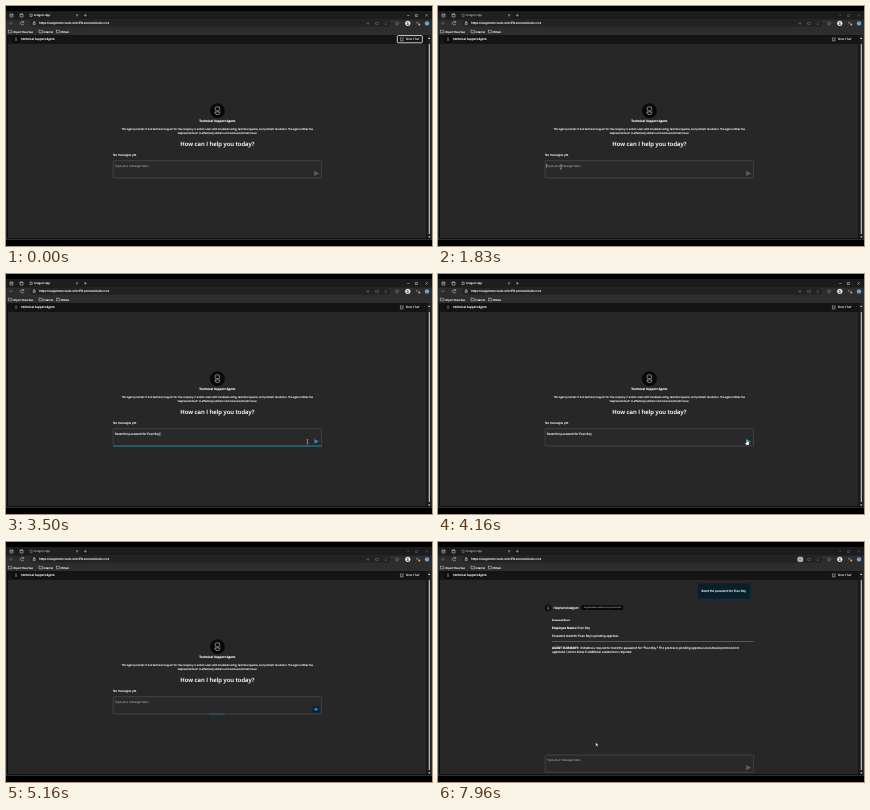
Recreate the animation shown at these times as an HTML page. Size 426 by 240 pixels, loop 8000 ms.

```html
<!DOCTYPE html>
<html lang="en">
<head>
<meta charset="utf-8">
<title>Support chat</title>
<style>
  html, body { margin: 0; width: 100%; height: 100%; overflow: hidden; background: #000; }
  svg { display: block; width: 100vw; height: 100vh; }
  text { font-family: "Open Sans", "Noto Sans", sans-serif; fill: currentColor; stroke: currentColor; stroke-width: .1px; text-rendering: geometricPrecision; white-space: pre; }
  .b { font-weight: 700; }
  .semi { font-weight: 600; }
  .mid { text-anchor: middle; }
  .line { fill: none; stroke: #ddd; stroke-width: .5; }
  .dim { stroke: #777; }
</style>
</head>
<body>
<svg id="stage" viewBox="0 0 426 240" preserveAspectRatio="none"></svg>
<script>
const LOOP = 8000;
const PERSON = "Evan Roy";
const REQUEST = `Reset the password for ${PERSON}`;
const TOOLBAR = "#2d2d2d";
const stage = document.getElementById("stage");

function add(parent, tag, attrs, content) {
  const node = document.createElementNS("http://www.w3.org/2000/svg", tag);
  for (const key in attrs) node.setAttribute(key, attrs[key]);
  if (content) node.textContent = content;
  return parent.appendChild(node);
}
const group = (parent, attrs = {}) => add(parent, "g", attrs);
const rect = (p, x, y, width, height, fill, more) => add(p, "rect", { x, y, width, height, fill, ...more });
const dot = (p, cx, cy, r, fill) => add(p, "circle", { cx, cy, r, fill });
const path = (p, d, more) => add(p, "path", { d, class: "line", ...more });
const label = (p, x, y, content, size = 2.95, cls = "", color = "#fff") =>
  add(p, "text", { x, y, class: cls, style: `font-size:${size}px;color:${color}` }, content);

// Browser frame
rect(stage, 0, 0, 426, 240, "#000");
rect(stage, 0, 5, 426, 9, "#1c1c1c");
rect(stage, 0, 13.5, 426, 15.5, TOOLBAR);
rect(stage, 22, 6, 52, 8, "#1f1f1f", { rx: 1.5 });
rect(stage, 24, 14.3, 360, 6.2, "#222", { rx: 3 });
path(stage, "M4 8h3v3h-3zM4 9h3M14 8h3v3h-3zM14 8.4h3");
path(stage, "M7 17.3h-3.4l1.4-1.4m-1.4 1.4l1.4 1.4", { class: "line dim" });
path(stage, "M17.5 16.2a1.7 1.7 0 1 0 .3 1.6m-.2-2.6v1.4h-1.3");
path(stage, "M27.2 16.8h2v1.8h-2zM27.6 16.8v-.8a.6 .6 0 0 1 1.2 0v.8", { "stroke-width": .4 });
path(stage, "M70.2 8.4l1.8 1.8m0-1.8l-1.8 1.8M78 9.3h2.6m-1.3-1.3v2.6", { "stroke-width": .4 });
label(stage, 33, 18.3, "https://aaqpmstec-web-robcil5t.azurewebsites.net", 3);

const tab = group(stage);
path(tab, "M24 8.2h2.2v2.2h-2.2z", { "stroke-width": .4 });
label(tab, 28, 10.3, "AI Agent App", 2.7);
const controls = group(stage);
path(controls, "M401.2 9.5h2.2M409.4 8.5h2v2h-2zM419.6 8.4l2 2m0-2l-2 2", { "stroke-width": .45 });

for (const [x, name] of [[2.5, "Import Favorites"], [33, "Internal"], [50.5, "Others"]]) {
  path(stage, `M${x} 24h1.2l.5 .6h1.7v2.2h-3.4z`, { "stroke-width": .4 });
  label(stage, x + 4.6, 26.5, name, 2.58);
}

const pill = rect(stage, 359.4, 14.8, 5.8, 5.2, "#b4b4b4", { rx: 1.8 });
path(stage, "M360.5 17.4h3M362 16v2.8M369.6 16.4h2.8v2h-2.8zM378.8 16.3l1 1.1 1-1.1m-2 2.3h2", { class: "line dim" });
path(stage, "M390 15.8h1v3.2h-1zM391 16.2l2.3 1.2-2.3 1.3", { class: "line dim" });
dot(stage, 401.8, 17.3, 2.6, "#eee7da");
dot(stage, 401.8, 16.6, .8, "#77604f");
rect(stage, 400.6, 17.5, 2.4, 1.6, "#77604f", { rx: .8 });
path(stage, "M410 17.4l1.4-1.2 1 1.4");
dot(stage, 413.3, 18.4, 1, "#e4ad32");
dot(stage, 421, 17.4, 2.2, "#739fd2");

// Page shell
rect(stage, 0, 29, 426, 205, TOOLBAR);
rect(stage, 1, 29, 424, 204, "#0a0a0a");
rect(stage, 2, 29, 418.5, 203.3, "#272727");
rect(stage, 2, 29, 418.5, 9, "#141414");
rect(stage, 421.3, 29, 3.7, 203.3, "#202020");
rect(stage, 422.7, 38, 1.3, 190, "#b4b4b4", { rx: .6 });
path(stage, "M422 33l1.2-1.6 1.2 1.6zM422 230.5l1.2 1.6 1.2-1.6z", { style: "fill:#ddd;stroke:none" });

function agentIcon(parent, x, y, scale) {
  const g = group(parent, { transform: `translate(${x} ${y}) scale(${scale})` });
  dot(g, 0, 0, 7.4, "#080808");
  const style = "stroke:#d0d0d0;stroke-width:.6";
  rect(g, -2.2, -3.8, 4.4, 3.8, "none", { rx: 1.1, style });
  path(g, "M-.9 -2h.1M.8 -2h.1M-2.4 1.2h4.8v1q-.4 1.7-2.4 1.7t-2.4-1.7z", { style });
}
agentIcon(stage, 10, 33.2, .45);
label(stage, 15, 34.2, "Technical Support Agent", 2.9, "semi");
const chatRing = rect(stage, 391.3, 29.6, 25, 7.2, "none", { rx: 1, stroke: "#fff", "stroke-width": .8 });
path(stage, "M397 32.8v2.1h-2.6v-3h1.8m-.2 1.4l1.8-1.8", { "stroke-width": .4 });
label(stage, 399.8, 34.2, "New Chat", 3, "", "#ddd");

// Welcome view
const welcome = group(stage);
agentIcon(welcome, 211.4, 104.7, 1);
label(welcome, 211.3, 115.7, "Technical Support Agent", 2.97, "b mid");
label(welcome, 211.3, 124.2, "This agent provides IT and technical support for the company. It assists users with troubleshooting, technical queries, and problem resolution. The agent utilizes the", 2.53, "mid");
label(welcome, 211.3, 127.8, "'HelpServiceTools' to effectively address and resolve technical issues.", 2.53, "mid");
label(welcome, 211.4, 140, "How can I help you today?", 5.9, "semi mid");
label(welcome, 107, 150, "No messages yet.");

// Answer view
const answer = group(stage);
rect(answer, 260, 41.2, 52.3, 15.6, "#08202c", { rx: 1.4 });
label(answer, 263.4, 50.1, REQUEST);
agentIcon(answer, 110.2, 66, .44);
label(answer, 115.5, 66.9, "HelpServiceAgent", 2.95, "semi");
rect(answer, 143.4, 63.3, 41.8, 4.8, "#080808", { rx: 1 });
label(answer, 164.3, 66.4, "AI-generated content may be incorrect", 2.05, "mid", "#888");
label(answer, 114, 78.9, "Password Reset", 2.3, "b");
const nameRow = label(answer, 114, 86.8, "", 2.97);
add(nameRow, "tspan", { class: "b" }, "Employee Name:");
add(nameRow, "tspan", {}, ` ${PERSON}`);
label(answer, 114, 95, `Password reset for ${PERSON} is pending approval.`, 2.95);
rect(answer, 114, 99.4, 201.5, .5, "#8a8a8a");
const summary = label(answer, 114, 106.7, "", 2.97);
add(summary, "tspan", { class: "b" }, "AGENT SUMMARY:");
add(summary, "tspan", {}, ` I initiated a request to reset the password for "${PERSON}." The process is pending approval and should proceed once`);
label(answer, 114, 111.3, "approved. Let me know if additional assistance is required.", 2.95);

// Message box
const box = group(stage);
rect(box, 107.2, 154.7, 208.4, 17.3, "#292929", { rx: .9, stroke: "#5c5c5c", "stroke-width": .5 });
const hint = label(box, 109, 161, "Type your message here...", 2.9, "", "#949494");
const typed = label(box, 109, 161, REQUEST);
const caret = rect(box, 0, 158, .4, 3.7, "#fff");
const send = path(box, "M308.3 165.6l4 1.8-4 1.8 .7-1.8zM309 167.4h1.8", { "stroke-width": .45 });
const stop = group(box);
rect(stop, 306.8, 164.2, 6.4, 6.4, "#0c1c28", { rx: 1.2 });
dot(stop, 310, 167.3, 1.7, "#1a7fc0");
const underline = rect(box, 107.2, 171.7, 208.6, .7, "#1994b4");

// Pointers
const pointers = {
  arrow: path(stage, "M0 0v3.6l.9-.8 .6 1.3 .6-.3-.6-1.2h1.1z", { style: "fill:#fff;stroke:#000;stroke-width:.2" }),
  beam: path(stage, "M-.8 -2h1.6M0 -2v4M-.8 2h1.6", { style: "stroke:#e6e6e6;stroke-width:.45" }),
  hand: path(stage, "M-.5 -1.9q.5-.6 1 0v1.7l1.5 .4q.5 .3 .3 1l-.5 1.7h-2.4l-1.3-1.7q.1-.8 1.4-.1z", { style: "fill:#fff;stroke:#111;stroke-width:.2" })
};

// Rows: time, value(s)
const linePhase = [[1900, 0], [2130, 1], [3960, 1], [4120, 0], [4300, 0], [4560, 1], [5030, 1], [5160, .077]];
const route = [
  [960, 178, 178], [1300, 145, 170], [1630, 123, 161], [2760, 123, 161],
  [2900, 173, 163], [3160, 258, 166], [3560, 309, 168], [5030, 309, 168]
];
const lateRoute = [[7760, 176, 188], [7960, 157.8, 200.6]];

function sample(rows, t) {
  if (t <= rows[0][0]) return rows[0].slice(1);
  for (let i = 1; i < rows.length; i++) {
    const a = rows[i - 1], b = rows[i];
    if (t < b[0]) {
      const k = (t - a[0]) / (b[0] - a[0]);
      return a.slice(1).map((v, j) => v + (b[j + 1] - v) * k);
    }
  }
  return rows[rows.length - 1].slice(1);
}
const within = (t, from, to) => t >= from && t < to;
const show = (node, on) => node.setAttribute("visibility", on ? "visible" : "hidden");
const typedWidth = typed.getComputedTextLength();

function drawPointer(t) {
  const late = t >= 7760;
  const [x, y] = sample(late ? lateRoute : route, t);
  const kind = late || y > 172 ? "arrow" : x > 305 ? "hand" : "beam";
  const visible = late || within(t, 960, 5030);
  for (const name in pointers) show(pointers[name], visible && name === kind);
  pointers[kind].setAttribute("transform", `translate(${x} ${y})`);
}

function draw(t) {
  const active = t < 500 || within(t, 1900, 5030);
  const answered = t >= 6100;
  const filled = within(t, 2360, 4230);
  const busy = within(t, 4230, 6100);

  tab.setAttribute("opacity", active ? 1 : .6);
  controls.setAttribute("opacity", active ? 1 : .4);
  show(chatRing, t < 500);
  show(pill, answered);
  show(welcome, !answered);
  show(answer, answered);

  box.setAttribute("transform", `translate(0 ${answered ? 58.3 : 0})`);
  show(hint, !filled);
  show(typed, filled);
  show(caret, within(t, 1830, 3960) || within(t, 4300, 5030));
  caret.setAttribute("x", filled ? 109.2 + typedWidth : 108.5);
  show(send, !busy);
  send.style.stroke = filled ? "#1b9fd0" : "#999";
  send.style.fill = filled ? "#1b9fd0" : "none";
  show(stop, busy);

  const [scale] = sample(linePhase, t);
  underline.setAttribute("transform", `translate(${211 * (1 - scale)} 0) scale(${scale} 1)`);
  underline.setAttribute("opacity", .6 + .4 * scale);
  show(underline, scale > 0 && !answered);
  drawPointer(t);
}

const start = performance.now();
function tick() {
  draw((performance.now() - start) % LOOP);
  requestAnimationFrame(tick);
}
tick();
</script>
</body>
</html>
```
